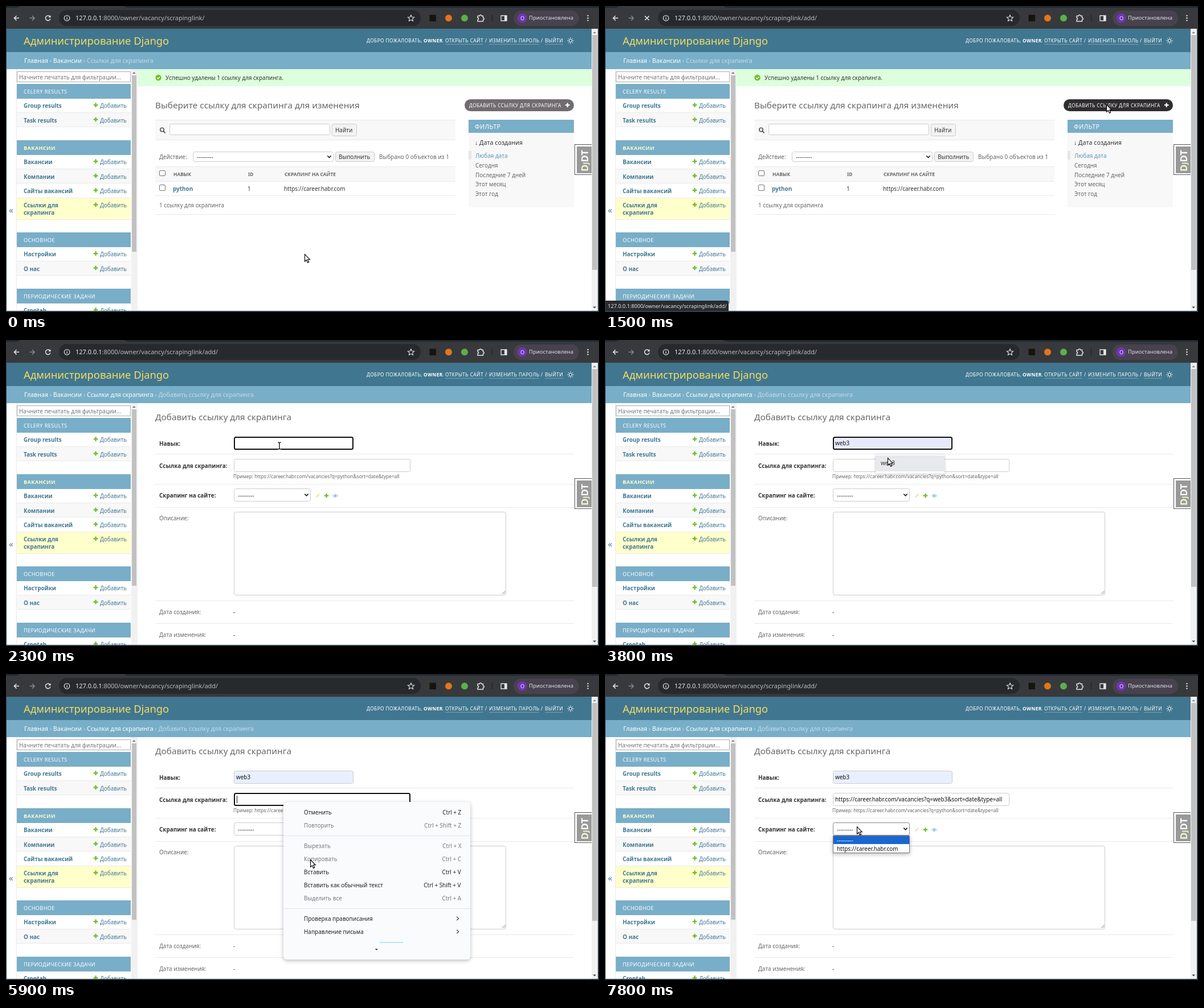
An HTML page for the animation above (8 s loop, 1041 px wide and 538 px high).

```html
<!DOCTYPE html>
<html lang="ru">
<head>
<meta charset="utf-8">
<title>Ссылки для скрапинга</title>
<style>
html, body { margin: 0; width: 100%; height: 100%; overflow: hidden; background: #fff; }
#stage { position: absolute; left: 0; top: 0; width: 1041px; height: 538px; overflow: hidden;
  font-family: "Noto Sans", "Open Sans", sans-serif; color: #333; }
.layer { position: absolute; left: 0; top: 0; width: 1041px; height: 538px; }
.box { position: absolute; box-sizing: border-box; }
.t { position: absolute; white-space: pre; line-height: 0; transform-origin: 0 0;
  transform: scale(.762) translateY(-.388em); }
.t.right { transform-origin: 100% 0; }
.t.up { transform: rotate(-90deg) scale(.762) translateY(-.388em); font-weight: 700; color: #fff; }
.t u { text-decoration: none; border-bottom: 1px solid #8fb0c0; padding-bottom: 1px; }
.caps { letter-spacing: .5px; }
.b { font-weight: 700; }
.link { color: #417893; }
.gray { color: #666; }
.field { border: 1px solid #ccc; border-radius: 3.5px; background: #fff; }
.focus { border: 2px solid #101010; }
.bar { background: #79aec8; }
.pale { background: #f8f8f8; }
svg { position: absolute; left: 0; top: 0; overflow: visible; fill: none; }
</style>
</head>
<body>
<div id="stage"></div>
<script>
const stage = document.getElementById('stage');

function add(parent, cls, css = '', html = '') {
  const el = document.createElement('div');
  el.className = cls;
  el.style.cssText = css;
  el.innerHTML = html;
  parent.appendChild(el);
  return el;
}
const layer = (parent = stage) => add(parent, 'layer');
const box = (p, x, y, w, h, cls = '', css = '') =>
  add(p, 'box ' + cls, `left:${x}px;top:${y}px;width:${w}px;height:${h}px;${css}`);
// x is the visible left edge, y the baseline, size the unscaled font size
const text = (p, x, y, size, str, cls = '', css = '') =>
  add(p, 't ' + cls, `left:${x - .7}px;top:${y}px;font-size:${size}px;${css}`, str);
const textRight = (p, x, y, size, str, css = '') =>
  add(p, 't right', `right:${1041 - x}px;top:${y}px;font-size:${size}px;${css}`, str);
const draw = (p, shapes) => add(p, 'layer', '', `<svg width="1041" height="538">${shapes}</svg>`);
const path = (d, stroke, w = 1, fill = 'none') =>
  `<path d="${d}" stroke="${stroke}" stroke-width="${w}" fill="${fill}"/>`;
const plus = (x, y, r, color, w) => path(`M${x - r} ${y}h${2 * r}M${x} ${y - r}v${2 * r}`, color, w);
const tri = (x, y, r, dir, color) => path(`M${x - r} ${y + dir * r / 2}h${2 * r}l${-r} ${-dir * r}z`, 'none', 0, color);
const chevron = (x, y) => path(`M${x - 3.2} ${y - 1.7}l3.2 3.3 3.2-3.3`, '#222', 1.6);
const line = (p, x, y, w, color = '#e9e9e9') => box(p, x, y, w, 1, '', `background:${color}`);

/* ---------- page shell ---------- */
const page = layer();
box(page, 0, 40, 1041, 498, '', 'background:#fff');
box(page, 1, 40, 1027, 41, '', 'background:#417690');
box(page, 1, 81, 1027, 29.5, 'bar');
text(page, 32, 67.5, 24, 'Администрирование Django', '', 'color:#f5dd5d');

const tools = (x, s, cls = '') => text(page, x, 63.5, 11, s, 'caps ' + cls, 'color:#fff');
tools(633.5, 'ДОБРО ПОЖАЛОВАТЬ,');
tools(734, 'OWNER', 'b');
tools(767, '.');
tools(771.5, '<u>ОТКРЫТЬ САЙТ</u>');
tools(842, '/');
tools(848.5, '<u>ИЗМЕНИТЬ ПАРОЛЬ</u>');
tools(939.5, '/');
tools(946.5, '<u>ВЫЙТИ</u>');
let rays = '';
for (let i = 0; i < 8; i++) {
  const c = Math.cos(i * Math.PI / 4), s = Math.sin(i * Math.PI / 4);
  rays += `M${991 + 4 * c} ${61 + 4 * s}L${991 + 5.8 * c} ${61 + 5.8 * s}`;
}
draw(page, path(rays, '#fff', 1) + '<circle cx="991" cy="61" r="2.7" stroke="#fff"/>');

/* ---------- sidebar ---------- */
const side = layer(page);
box(side, 18, 111, 1, 425, '', 'background:#eaeaea');
text(side, 6, 364.5, 20, '«', 'link');
box(side, 19, 115, 199.5, 19, '', 'border:1px solid #aaa;background:#fff');
text(side, 23.5, 128.5, 13, 'Начните печатать для фильтрации...', '', 'color:#757575');

function section(y, title, rows, current) {
  box(side, 19, y, 199.5, 25.5, 'bar');
  text(side, 31.5, y + 16.7, 12, title, 'caps' + (current ? ' b' : ''), `color:${current ? '#ffffcc' : '#fff'}`);
  rows.forEach((row, i) => {
    const top = y + 25.7 + i * 25.4, parts = row.split('|'), chosen = parts.length > 1;
    const h = chosen ? 38 : 25.4;
    box(side, 19, top, 199.5, h, '',
      `background:${chosen ? '#ffffcc' : i % 2 ? '#f8f8f8' : '#fff'};border-bottom:1px solid #eaeaea`);
    parts.forEach((s, k) => text(side, 31.5, top + 16.4 + k * 12.4, 13, s, 'b link'));
    text(side, 165.5, top + 16.4, 13, 'Добавить', 'link');
    draw(side, plus(157.5, top + 11.4, 3.8, '#70bf2b', 2.4));
  });
}
section(137, 'CELERY RESULTS', ['Group results', 'Task results']);
section(236, 'ВАКАНСИИ', ['Вакансии', 'Компании', 'Сайты вакансий', 'Ссылки для|скрапинга'], true);
section(398, 'ОСНОВНОЕ', ['Настройки', 'О нас']);
section(497, 'ПЕРИОДИЧЕСКИЕ ЗАДАЧИ', ['Crontab']);
box(side, 219.5, 110.5, 11, 427, '', 'background:#f1f1f1');
box(side, 220.5, 122, 8.5, 310, '', 'background:#c1c1c1');
draw(side, tri(224.7, 117.5, 3, 1, '#777'));

/* ---------- change list ---------- */
const list = layer(page);
const dim = s => `<span style="color:#c4dce8">${s}</span>`;
const crumbs = (p, links, last) => text(p, 32.5, 99.8, 14,
  links.map(s => s + dim(' › ')).join('') + dim(last), '', 'color:#fff');
crumbs(list, ['Главная', 'Вакансии'], 'Ссылки для скрапинга');

box(list, 230.5, 110.5, 797.5, 30.5, '', 'background:#ddffdd');
draw(list, '<circle cx="267.5" cy="126" r="5.2" fill="#70bf2b"/>' + path('M265 126l2 2 3.3-3.6', '#fff', 1.3));
text(list, 281, 130, 13, 'Успешно удалены 1 ссылку для скрапинга.');
text(list, 262.5, 180.5, 20, 'Выберите ссылку для скрапинга для изменения', 'gray');

const pill = box(list, 805, 164, 191.5, 20.5, '', 'border-radius:11px');
text(list, 814, 177.6, 11, 'ДОБАВИТЬ ССЫЛКУ ДЛЯ СКРАПИНГА', 'caps', 'color:#fff');
draw(list, plus(985.7, 174.2, 3.8, '#fff', 2.2));

const edges = 'border-top:1px solid #e9e9e9;border-bottom:1px solid #e9e9e9';
box(list, 262, 200, 527, 36, 'pale', edges);
draw(list, '<circle cx="274" cy="217.5" r="3.2" stroke="#555" stroke-width="1.6"/>' + path('M276.3 220l3.3 3.4', '#555', 2));
box(list, 286.5, 207, 282.5, 20, 'field');
const button = (x, y, w, h, s) => {
  box(list, x, y, w, h, 'field', 'background:#f3f3f3');
  text(list, x + 7.2, y + h / 2 + 4, 13, s);
};
button(571.5, 207, 44.5, 21.5, 'Найти');
text(list, 269.5, 268.8, 13, 'Действие:', 'gray');
box(list, 328, 256, 246.5, 17.5, 'field');
text(list, 336, 268.8, 13, '---------');
draw(list, chevron(567.5, 265));
button(577.5, 256, 69, 17.5, 'Выполнить');
text(list, 655.5, 268.8, 13, 'Выбрано 0 объектов из 1', 'gray');

box(list, 262, 282, 527, 26.5, 'pale', edges);
const check = y => box(list, 269, y, 10.5, 10.5, '', 'border:1px solid #767676;border-radius:2px;background:#fff');
check(288.5);
check(314);
text(list, 295, 299, 11, 'НАВЫК', 'b gray');
text(list, 426, 299, 11, 'ID', 'b gray');
text(list, 489.5, 299, 11, 'СКРАПИНГ НА САЙТЕ', 'b gray');
text(list, 293.5, 324.5, 13, 'python', 'b link');
text(list, 424.5, 324.5, 13, '1');
text(list, 488.5, 324.5, 13, 'https://career.habr.com');
line(list, 262, 333, 527);
text(list, 270, 354, 13, '1 ссылку для скрапинга', 'gray');
line(list, 262, 366, 527);

box(list, 812, 200, 184.5, 154, 'pale');
box(list, 812, 200, 184.5, 22.5, 'bar');
text(list, 824, 216, 14, 'ФИЛЬТР', 'caps', 'color:#fff');
text(list, 824, 243.5, 14, '↓ Дата создания');
box(list, 812, 255, 4.5, 15, '', 'background:#e6e6e6');
['Любая дата', 'Сегодня', 'Последние 7 дней', 'Этот месяц', 'Этот год'].forEach((s, i) =>
  text(list, 824.5, 267 + i * 16.8, 13, s, 'gray', i ? '' : 'color:#5b95b5'));

/* ---------- add form ---------- */
const form = layer(page);
crumbs(form, ['Главная', 'Вакансии', 'Ссылки для скрапинга'], 'Добавить ссылку для скрапинга');
text(form, 262.5, 142.3, 20, 'Добавить ссылку для скрапинга', 'gray');
[200, 252.5, 294, 458, 498].forEach(y => line(form, 262, y, 734.5));
const label = (y, s, cls) => text(form, 269.5, y, 13, s, cls);
label(186, 'Навык:', 'b');
label(225, 'Ссылка для скрапинга:', 'b');
label(277, 'Скрапинг на сайте:', 'b');
label(317.2, 'Описание:', 'gray');
label(482.3, 'Дата создания:', 'gray');
label(521.5, 'Дата изменения:', 'gray');
text(form, 400, 482.3, 13, '-');
text(form, 400, 521.5, 13, '-');
const skill = box(form, 399.5, 169.5, 210.5, 23, 'field');
const skillText = text(form, 405, 185.3, 13, 'web3', '', 'color:#111');
const skillCaret = box(form, 429.5, 174.5, 1, 13, '', 'background:#111');
const url = box(form, 399.5, 208.5, 310, 23.5, 'field');
const urlCaret = box(form, 405, 213.5, 1, 13, '', 'background:#111');
const urlText = text(form, 405, 224.3, 13, 'https://career.habr.com/vacancies?q=web3&amp;sort=date&amp;type=all', '', 'color:#111');
text(form, 400, 243, 11, 'Пример: https://career.habr.com/vacancies?q=python&amp;sort=date&amp;type=all', 'gray');
const site = box(form, 399.5, 261, 135, 23, 'field');
text(form, 408, 276.5, 13, '---------');
box(form, 399.5, 301.5, 478.5, 147, 'field');
draw(form, chevron(527.5, 272.3) +
  path('M543.5 277.5l1-2.7 5-5 1.8 1.8-5 5z', 'none', 0, '#f6e3ac') +
  plus(562.5, 273.7, 3.8, '#70bf2b', 2.3) +
  path('M573.3 274q4.7-5.6 9.4 0q-4.7 5.6-9.4 0z', '#b5d4ea', 1.1, '#dcebf6') +
  '<circle cx="578" cy="274" r="1.9" fill="#93c0e2"/>' +
  path('M871 446.5l5.5-5.5M874 446.5l2.5-2.5', '#777', .9));

/* ---------- debug handle and page scrollbar ---------- */
box(page, 998, 243, 30, 54, '', 'background:#fff;border:1px solid #555;border-right:0');
box(page, 1002, 247, 25.5, 46.5, '', 'background:#999');
text(page, 1022.2, 290.5, 22, '<span style="color:#eefbd0">D<span style="font-size:16px">J</span></span>DT', 'up');
box(page, 1028, 40, 13, 498, '', 'background:#f1f1f1');
const thumb = box(page, 1029, 51, 8.5, 413, '', 'background:#c1c1c1');
draw(page, tri(1033.2, 46.5, 3, 1, '#888') + tri(1033.2, 530, 3, -1, '#444'));

/* ---------- popups ---------- */
const shadow = 'box-shadow:0 2px 7px rgba(0,0,0,.28);';
const hint = layer();
box(hint, 475, 201, 121, 33.5, '', 'background:#fff;border-radius:2px;box-shadow:0 1px 4px rgba(0,0,0,.25)');
const hintRow = box(hint, 475, 203, 121, 27.5, '', 'background:#e8e9ec');
text(hint, 485, 220, 13, 'web3');

const menu = layer();
box(menu, 486.5, 225, 328, 277, '', 'background:#fafbfd;border-radius:6px;' + shadow);
const items = [
  [247, 'Отменить', 'Z'], [270, 'Повторить', 'Shift + Z', 1], [306, 'Вырезать', 'X', 1],
  [329, 'Копировать', 'C', 1], [352, 'Вставить', 'V'], [375, 'Вставить как обычный текст', 'Shift + V'],
  [398, 'Выделить все', 'A', 1], [434, 'Проверка правописания'], [457, 'Направление письма']
].map(([y, s, key, off]) => {
  const els = [text(menu, 523.5, y, 13, s)];
  if (key) els.push(textRight(menu, 799, y, 13, 'Ctrl + ' + key));
  else draw(menu, path(`M791.3 ${y - 7.3}l3.2 3.2-3.2 3.2`, '#333', 1.2));
  return { y, off, els };
});
line(menu, 486.5, 283.5, 328, '#e2e4e7');
line(menu, 486.5, 411.5, 328, '#e2e4e7');
box(menu, 656, 470.5, 41, 2, '', 'background:#b7e4f4');
draw(menu, tri(650.3, 484.5, 2.6, -1, '#222'));

const options = layer();
box(options, 399.5, 284, 135, 30.5, '', 'background:#fff;border:1px solid #777;' + shadow);
box(options, 400.5, 285, 133, 14.2, '', 'background:#1967d2');
text(options, 408, 296, 13, '---------', '', 'color:#fff');
text(options, 408, 310.8, 13, 'https://career.habr.com', '', 'color:#111');

/* ---------- browser frame ---------- */
const frame = layer();
const ink = '#e3e5e8';
box(frame, 0, 0, 1041, 40, '', 'background:#37393c');
box(frame, 0, 0, 1041, 2.5, '', 'background:#1f2a30');
draw(frame, path('M18 3q5-.5 6-3h184q1 2.5 7 3z', 'none', 0, '#37393c'));
box(frame, 93, 7, 635, 28, '', 'background:#28292c;border-radius:14px');
draw(frame,
  path('M23 21.3H14.5M18.5 17.2l-4.1 4.1 4.1 4.1', ink, 1.5) +
  path('M41.5 21.3h8.5M46 17.2l4.1 4.1-4.1 4.1', '#85888c', 1.5) +
  `<circle cx="107" cy="21.3" r="4.8" stroke="${ink}" stroke-width="1.2"/>` +
  path('M107 20.7v3.3M107 18.4v1.3', ink, 1.3) +
  path('M711 15.8l1.6 3.7 4 .3-3 2.7.9 3.9-3.5-2.1-3.5 2.1.9-3.9-3-2.7 4-.3z', ink, 1.1) +
  '<rect x="743.5" y="15.5" width="11.5" height="11.5" fill="#17140c"/>' +
  '<circle cx="777" cy="21.3" r="6" fill="#e2761b"/>' +
  '<circle cx="805" cy="21.3" r="6" fill="#5bb04a"/>' +
  path('M828 17.5h3.2a1.8 1.8 0 0 1 3.6 0h2.7v3.2a1.8 1.8 0 0 1 0 3.6v2.7h-9.5v-2.9a1.7 1.7 0 0 0 0-3.4z', ink, 1.4) +
  path('M853.5 15v12', '#222427', 1.2) +
  path('M869 17h10v9h-10z', ink, 1.3) + path('M875 17h4v9h-4z', 'none', 0, ink) +
  [17, 21.2, 25.4].map(y => `<circle cx="1021.5" cy="${y}" r="1.2" fill="${ink}"/>`).join(''));
box(frame, 891, 8, 114.5, 26.5, '', 'background:#48424f;border-radius:14px');
draw(frame, '<circle cx="906" cy="21.3" r="8.3" fill="#6f35b5"/>');
text(frame, 903.2, 24.8, 12, 'О', '', 'color:#eee');
text(frame, 918.5, 24.8, 12.4, 'Приостановлена', '', 'color:#dfe1e5');
const host = '127.0.0.1', route = ':8000/owner/vacancy/scrapinglink/';
const address = text(frame, 122.5, 25, 14.4,
  `<span style="color:#e8eaed">${host}</span>${route}<span>add/</span>`, '', 'color:#b9bcc1');
const addressEnd = address.lastChild;
const reload = draw(frame, path('M77.3 18.8a4.3 4.3 0 1 0 .6 3.6', ink, 1.5) + path('M78.5 16.2v4h-4z', 'none', 0, ink));
const stop = draw(frame, path('M70 17.6l7.4 7.4M77.4 17.6l-7.4 7.4', ink, 1.5));

const status = layer();
box(status, 0, 518, 217, 18.5, '', 'background:#2a2b2e;border-top-right-radius:4px');
text(status, 6, 531, 12, host + route + 'add/', '', 'color:#e3e5e8');

const rim = 'background:#2d414a';
box(stage, 0, 40, 1.2, 498, '', rim);
box(stage, 1038.5, 40, 2.5, 498, '', rim);
box(stage, 0, 536, 1041, 2, '', rim);

/* ---------- pointer ---------- */
const arrow = draw(stage, path('M.5 .5V13.2L3.4 10.5 5.5 15.3 7.7 14.3 5.6 9.7H9.3z', '#000', 1.1, '#fff'));
const beamPath = 'M-2.5-6q2 0 2.5 1.2q.5-1.2 2.5-1.2M0-5V5M-2.5 6q2 0 2.5-1.2q.5 1.2 2.5 1.2';
const beam = draw(stage, path(beamPath, '#fff', 3) + path(beamPath, '#000', 1.3));

// time, x, y
const track = [
  [0, 524, 436], [700, 874, 183], [800, 874, 183], [1000, 880, 173], [1600, 880, 173],
  [2300, 480, 186], [3100, 480, 186], [3600, 491, 204], [3700, 491, 204], [3800, 496, 207],
  [4000, 496, 207], [4300, 486, 223], [5200, 486, 223], [6100, 541, 341], [6400, 541, 341],
  [6500, 545, 345], [6900, 545, 345], [7600, 442, 268], [8000, 442, 268]
];
function pointer(t) {
  const i = track.findIndex(k => k[0] > t);
  const [t0, x0, y0] = track[i - 1], [t1, x1, y1] = track[i];
  const u = (t - t0) / (t1 - t0), e = u * u * (3 - 2 * u);
  return [x0 + (x1 - x0) * e, y0 + (y1 - y0) * e];
}

const show = (el, on) => { el.style.display = on ? '' : 'none'; };

function render(now) {
  // the picture changes ten times a second
  const t = Math.floor(now % 8000 / 100) * 100;
  const within = (a, b) => t >= a && t < b;
  const [x, y] = pointer(t);
  const added = t >= 1700;

  show(list, !added);
  show(form, added);
  thumb.style.height = (added ? 383 : 413) + 'px';
  pill.style.background = t >= 900 ? '#2f2d30' : '#706c70';
  show(status, within(1000, 1800));
  show(stop, within(1300, 1900));
  show(reload, !within(1300, 1900));
  show(addressEnd, t >= 1500);

  skill.classList.toggle('focus', t < 5100);
  skill.style.background = t < 3500 ? '#fff' : t < 4100 ? '#e8eafc' : '#e8f0fe';
  show(skillText, t >= 3500);
  show(skillCaret, within(4200, 4700));
  show(hint, within(3300, 4100));
  show(hintRow, t >= 3500);

  url.classList.toggle('focus', within(5100, 7800));
  show(urlCaret, within(5100, 6600));
  show(urlText, t >= 6600);
  show(menu, within(5100, 6500));
  for (const item of items) {
    const hot = !item.off && t >= 5300 && Math.abs(y - item.y + 4) < 11;
    for (const el of item.els) el.style.color = hot ? '#3b4753' : item.off ? '#77797c' : '#202124';
  }
  site.style.borderColor = t >= 7800 ? '#888' : '#ccc';
  show(options, t >= 7800);

  const typing = within(2200, 3400) || within(4200, 5100) || (t >= 6500 && y > 302);
  show(beam, typing);
  show(arrow, !typing);
  arrow.style.transform = beam.style.transform = `translate(${x}px,${y}px)`;
}

const start = performance.now();
function tick() {
  render(performance.now() - start);
  requestAnimationFrame(tick);
}
render(0);
requestAnimationFrame(tick);
</script>
</body>
</html>
```
